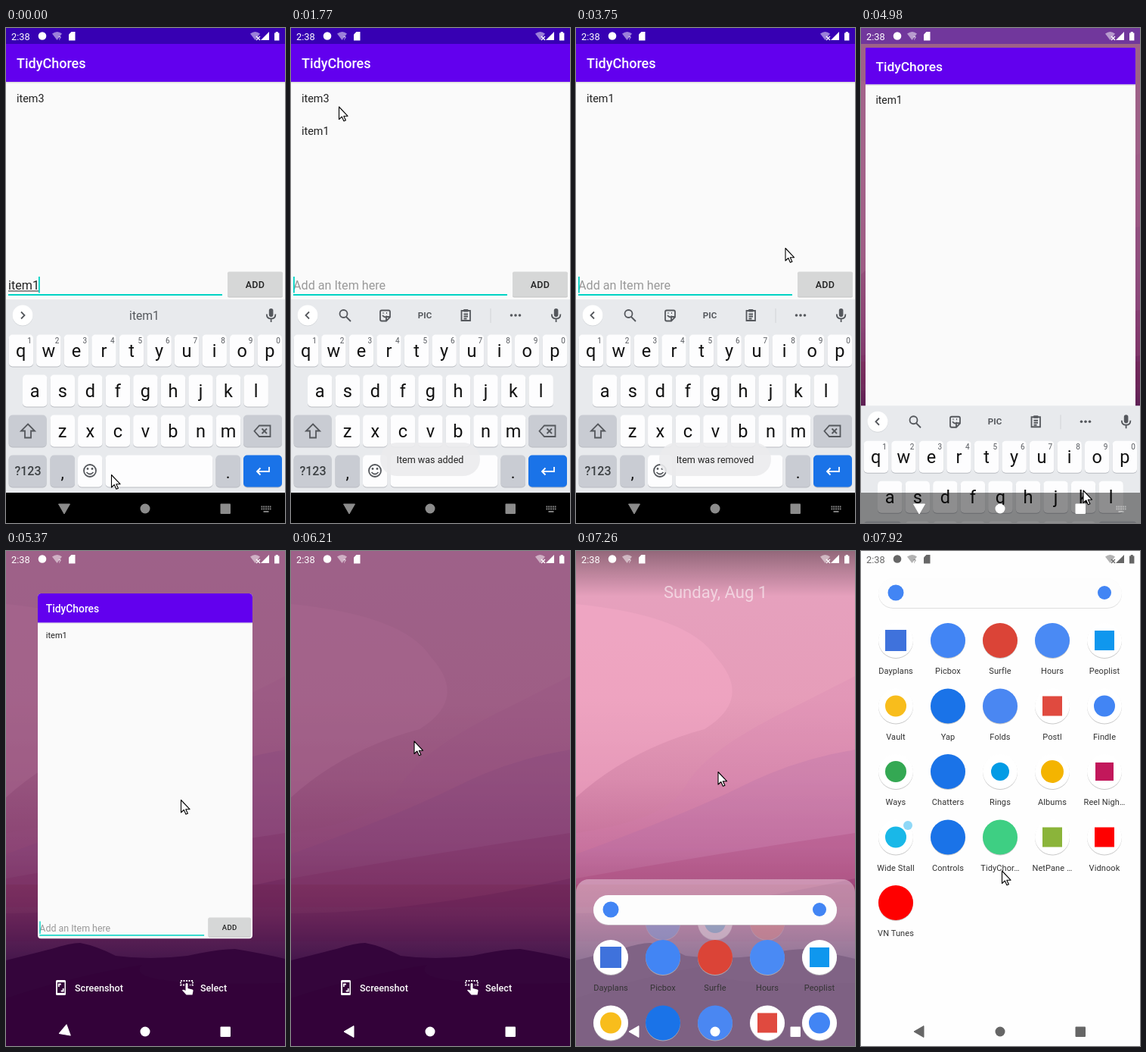
Write an HTML page that moves like this. It is 369 by 653 pixels and loops after 8000 ms.

```html
<!DOCTYPE html>
<html lang="en">
<head>
<meta charset="utf-8">
<title>Todo list demo</title>
<style>
html, body { margin: 0; width: 100%; height: 100%; overflow: hidden; background: #000; }
svg { display: block; width: 369px; height: 653px; font-family: Roboto, "Noto Sans", sans-serif; }
.line { fill: none; stroke: #55585d; stroke-width: 1.8; }
</style>
</head>
<body>
<svg id="stage" viewBox="0 0 369 653"></svg>
<script>
const W = 369, H = 653, LOOP = 8000;

// ---- drawing helpers
const rect = (x, y, w, h, fill, r = 0, more = '') =>
  `<rect x="${x}" y="${y}" width="${w}" height="${h}" rx="${r}" fill="${fill}" ${more}/>`;
const disc = (x, y, r, fill, more = '') => `<circle cx="${x}" cy="${y}" r="${r}" fill="${fill}" ${more}/>`;
const path = (d, fill, more = '') => `<path d="${d}" fill="${fill}" ${more}/>`;
const line = (d, more = '') => `<path class="line" d="${d}" ${more}/>`;
const text = (x, y, size, s, fill, more = '') =>
  `<text x="${x}" y="${y}" font-size="${size}" fill="${fill}" ${more}>${s}</text>`;
const group = (id, ...parts) => `<g id="${id}">${parts.join('')}</g>`;
const MID = 'text-anchor="middle"', MEDIUM = 'font-weight="500"';

// ---- wallpaper
const sky = [[0, '#e6a2bf'], [.3, '#e69db9'], [.46, '#d98bad'], [.6, '#c5709a'], [.66, '#b35a80'],
  [.735, '#964674'], [.79, '#6a3264'], [.83, '#502458']];
const wallpaper = () => group('wall',
  rect(0, 0, W, H, 'url(#sky)'),
  path('M0 70Q150 85 185 140Q235 195 170 235Q70 262 0 325z', '#f6acc8', 'opacity=".45"'),
  path('M0 372Q120 355 145 310T270 215T369 165V440H0z', '#cf7fae', 'opacity=".2"'),
  path('M0 400Q150 345 220 310T369 262V440H0z', '#a566a4', 'opacity=".2"'),
  path('M0 432Q180 400 369 372V470H0z', '#a03468', 'opacity=".22"'),
  path('M0 478Q160 478 369 432V515H0z', '#6b1c58', 'opacity=".22"'),
  path('M0 540Q40 530 60 525Q85 517 98 517Q120 521 145 534Q190 540 240 534Q280 525 303 525Q340 531 369 538V653H0z', '#35083d'),
  path('M0 590Q90 560 180 546Q150 575 369 570V653H0z', '#32033a', 'opacity=".7"'));

// ---- app window
const appWindow = () => group('app',
  `<g clip-path="url(#window)">`,
  rect(0, 21, W, 592, '#fafafa'),
  rect(0, 71, W, 1.5, '#dcdcdc'),
  rect(0, 21, W, 50, '#6200ee'),
  text(14, 53, 18, 'TidyChores', '#fff', MEDIUM),
  group('old', text(14, 98, 14.36, 'item3', '#212121')),
  group('fresh', text(14, 141, 14.36, 'item1', '#212121')),
  group('entry',
    rect(3, 351, 283, 2, '#00d3c4'),
    group('typed', text(3, 345, 16.15, 'item1', '#222'), rect(3, 346.5, 40, 1, '#222')),
    group('hint', text(3, 345, 16.15, 'Add an Item here', '#999')),
    group('caret', rect(0, 328, 1.8, 21.5, '#00d3c4')),
    rect(293, 322.5, 73, 33, '#c4c4c4', 2),
    group('button', rect(293, 321.5, 73, 33, '#d6d7d7', 2)),
    text(329.5, 342.5, 12.5, 'ADD', '#222', MID + MEDIUM.padStart(18) + ' letter-spacing=".3"')),
  `</g>`);

// ---- keyboard
const key = (x, y, w, fill = '#fdfdfe') => rect(x, y + 1, w, 42, '#b9bcc2', 5) + rect(x, y, w, 42, fill, 5);
const letters = (s, x0, y, digits) => [...s].map((c, i) => {
  const x = x0 + i * 36.55;
  return key(x, y, 32.5) + text(x + 16.2, y + 29, 23.5, c, '#111', MID) +
    (digits ? text(x + 27.5, y + 11, 10, (i + 1) % 10, '#55585d', MID) : '');
}).join('');
const GREY = '#c9ccd3';
const keyboard = () => group('keys',
  rect(0, 358, W, 256, '#e8eaed'),
  disc(22, 379.7, 13.5, '#cdd0d4'), disc(22, 379, 13.5, '#fff'),
  group('suggest', line('M20 374.5l4.5 4.5-4.5 4.5'),
    text(183, 385, 15.7, 'item1', '#55585d', MID)),
  group('tools', line('M24 374.5l-4.5 4.5 4.5 4.5'),
    `<circle class="line" cx="69.5" cy="377" r="5"/>`, line('M73 381l6 6'),
    line('M120 372.5h9q2 0 2 2v7l-5 5h-6q-2 0-2-2v-10q0-2 2-2zM131 381h-5v5M121 379q3 4 6 1M121.500 376h1M126 376h1'),
    text(177, 383, 11.5, 'PIC', '#55585d', MID + ' font-weight="700"'),
    line('M225.500 373h11.500v13h-11.500zM228.500 377.500h5.500M228.500 380.500h5.500M228.500 383.500h4'),
    rect(228, 371, 6.5, 3.5, '#55585d', 1),
    rect(263.5, 370, 1, 19, '#d2d4d8'),
    ...[291.5, 297, 302.5].map(x => disc(x, 379, 1.8, '#55585d'))),
  rect(347.8, 370, 5.6, 11, '#55585d', 2.8),
  line('M344.800 377.500q0 6 5.800 6t5.800-6M350.600 383.500v4.500', 'stroke-width="1.5"'),
  letters('qwertyuiop', 3.6, 404.5, true),
  letters('asdfghjkl', 22, 457.5),
  letters('zxcvbnm', 58.5, 510.5),
  key(3.6, 510.5, 50, GREY), key(314, 510.5, 51, GREY),
  line('M29 522.500l9 9h-5v9h-8v-9h-5z'),
  line('M335 524.500h14.500v14.500h-14.500l-6.500-7.250zM338.500 528.500l6.500 6.500M345 528.500l-6.500 6.500'),
  key(3.6, 563.5, 50, GREY), key(58.5, 563.5, 32.5, GREY), key(95, 563.5, 32.5),
  key(131.5, 563.5, 142), key(277.5, 563.5, 32.5, GREY), key(314, 563.5, 51, '#1a73e8'),
  text(29, 590, 16, '?123', '#3c4043', MID + ' ' + MEDIUM),
  text(74.7, 594, 22, ',', '#111', MID), text(293.7, 594, 22, '.', '#111', MID),
  `<circle class="line" cx="111" cy="584" r="8"/>`, line('M106.500 586q4.500 5 9 0'),
  disc(108, 581.5, 1.4, '#55585d'), disc(114, 581.5, 1.4, '#55585d'),
  line('M348 579v6h-16M336.500 580.500l-4.500 4.500 4.500 4.500', 'style="stroke:#fff"'));

const toast = (id, x, w, s) => group(id,
  rect(x, 547, w, 44, '#ececee', 22, 'opacity=".9"'),
  text(184, 574, 12.56, s, '#222', MID));

// ---- launcher
const WHITE = '#fff';
// label, disc colour, then for white discs the inner shape: colour, half size, square or not
const apps = [
  ['Dayplans', WHITE, '#3f72dc', 14, 1], ['Picbox', '#4285f4'], ['Surfle', '#db4437'], ['Hours', '#4a8af4'],
  ['Peoplist', WHITE, '#0f97ee', 13, 1], ['Vault', WHITE, '#f8bd1c', 14], ['Yap', '#1a73e8'],
  ['Folds', '#4a87f2'], ['Postl', WHITE, '#e04a3f', 13, 1], ['Findle', WHITE, '#4285f4', 14],
  ['Ways', WHITE, '#34a853', 14], ['Chatters', '#1a73e8'], ['Rings', WHITE, '#039be5', 12],
  ['Albums', WHITE, '#f4b400', 15], ['Reel Nigh…', WHITE, '#c2185b', 12, 1],
  ['Wide Stall', WHITE, '#19b8e8', 14], ['Controls', '#1a73e8'], ['TidyChor…', '#3ecf83'],
  ['NetPane …', WHITE, '#8bb43a', 13, 1], ['Vidnook', WHITE, '#f00', 13, 1], ['VN Tunes', '#f00']];
const badge = (x, y, [, base, mark, r, square]) =>
  disc(x, y + 1, 23, '#bbb', 'opacity=".8"') + disc(x, y, 23, base) +
  (!mark ? '' : square ? rect(x - r, y - r, 2 * r, 2 * r, mark) : disc(x, y, r, mark));
const colX = i => 46 + 69 * (i % 5);
const rowY = i => 118 + 86.5 * Math.floor(i / 5);
const drawer = () => group('drawer',
  group('grid', ...apps.map((a, i) => badge(colX(i), rowY(i), a) +
    text(colX(i), rowY(i) + 44, 11, a[0], '#333', MID + ' letter-spacing=".1"')),
    disc(62, 362, 6, '#8fd8f7')),
  rect(23, 37, 322, 39, '#ccc', 19.5, 'opacity=".6"'),
  rect(23, 36, 322, 39, '#fdfdfd', 19.5),
  disc(46, 55, 10.5, '#4285f4'), disc(322, 55, 9, '#4285f4'));
const home = () => group('home',
  rect(0, 0, W, 60, 'url(#shade)'),
  group('date', text(184.5, 62, 22, 'Sunday, Aug 1', '#fff', MID)),
  group('dock', ...[11, 15, 2].map((n, i) => badge(115 + 69 * i, 0, apps[n]))));

const actions = () => group('actions',
  path('M67.500 566h10q1.500 0 1.500 1.500v17q0 1.500-1.500 1.500h-10q-1.500 0-1.500-1.500v-17q0-1.500 1.500-1.500zM68 569v14h9.500v-14z', '#fff', 'fill-rule="evenodd"'),
  line('M69.800 575v-3.500h3M75.700 577v3.500h-3', 'style="stroke:#fff"'),
  text(91, 580.5, 12.6, 'Screenshot', '#fff', MEDIUM),
  line('M236 572.500h-5v-5.500h16v5.500h-4', 'style="stroke:#fff" stroke-dasharray="2 1.500"'),
  path('M237.500 571q1.500-2 3 0v6l6 1.500q1.500.5 1 2l-1 5h-8l-5.500-6q1-1.500 4.500.5z', '#fff'),
  text(257, 580.5, 12.6, 'Select', '#fff', MEDIUM));

// ---- system bars and mouse arrow
const statusBar = () => group('status',
  text(7, 15.5, 12.8, '2:38', 'currentColor'),
  disc(48, 10.5, 5.3, 'currentColor'),
  path('M61 7.500q7-5 13 0l-6.500 8.500z', 'currentColor', 'opacity=".5"'),
  text(69, 16, 8, '?', 'currentColor'),
  path('M83 8.500l3.500-3.500h5v11.500h-8.500z', 'currentColor'),
  path('M323 7.500q6.500-5 13 0l-6.500 8.500z', 'currentColor', 'opacity=".5"'),
  path('M331 11l5 5m0-5l-5 5', 'none', 'stroke="currentColor" stroke-width="1.3"'),
  path('M337 16h11v-11z', 'currentColor'),
  path('M355 6.500h1.700v-1.500h3v1.500h1.700v10h-6.400z', 'currentColor'));
const navBar = () => group('nav',
  group('back', path('M-7 0L6-7.500V7.500z', 'currentColor', 'stroke="currentColor" stroke-linejoin="round"')),
  disc(184, 634, 6.5, 'currentColor'),
  rect(283.5, 627.5, 13.5, 13.5, 'currentColor', 1),
  group('switcher', line('M337.500 631.500h13M337.500 634.500h13', 'style="stroke:currentColor" stroke-dasharray="1.800 1"'),
    line('M340.500 638h7', 'style="stroke:currentColor"')));
const arrow = () => group('arrow',
  path('M0 0V16.500L3.800 13l2.600 5.800 2.500-1.100-2.600-5.500h5.200z', '#fff', 'stroke="#000" stroke-width="1.100" stroke-linejoin="round"'));

document.getElementById('stage').innerHTML =
  `<defs><linearGradient id="sky" x2="0" y2="1">${sky.map(([o, c]) => `<stop offset="${o}" stop-color="${c}"/>`).join('')}</linearGradient>
  <linearGradient id="shade" x2="0" y2="1"><stop stop-opacity=".36"/><stop offset="1" stop-opacity="0"/></linearGradient>
  <clipPath id="window"><rect id="frame" x="0" y="21" width="369" height="592"/></clipPath></defs>` +
  wallpaper() + group('scrim', rect(0, 0, W, H, '#320038')) + home() +
  group('panel', rect(0, 0, W, H + 40, '#fefefe', 17)) + drawer() + actions() + appWindow() + keyboard() +
  group('bars', rect(0, 0, W, 21, '#3700b3'), rect(0, 613, W, 40, '#000')) +
  toast('added', 118, 132, 'Item was added') + toast('removed', 110, 148, 'Item was removed') +
  statusBar() + navBar() + arrow();

// ---- timeline
const $ = {};
document.querySelectorAll('[id]').forEach(e => $[e.id] = e);
const fade = (id, o) => {
  $[id].setAttribute('opacity', o);
  $[id].style.display = o > 0 ? '' : 'none';
};
const move = (id, x, y, more = '') => $[id].setAttribute('transform', `translate(${x} ${y}) ${more}`);
const clamp = v => Math.max(0, Math.min(1, v));

// rows of [time, value, ...], linear in between
function track(rows, t, col = 1) {
  const i = rows.findIndex(r => r[0] > t);
  if (i < 0) return rows[rows.length - 1][col];
  if (i === 0) return rows[0][col];
  const a = rows[i - 1], b = rows[i];
  return a[col] + (b[col] - a[col]) * (t - a[0]) / (b[0] - a[0]);
}

// the screen refreshes only at these times
const ticks = [0, 120, 270, 390, 540, 660, 810, 930, 1080, 1230, 1350, 1500, 1620, 1770, 1890, 2040, 2190, 2310, 2430,
  2730, 2850, 3000, 3120, 3240, 3390, 3510, 3630, 3750, 3900, 4020, 4170, 4290, 4440, 4560, 4710, 4830,
  4980, 5100, 5220, 5370, 5490, 5640, 5790, 5940, 6060, 6210, 6330, 6450, 6600, 6720, 6840, 6960,
  7110, 7260, 7380, 7510, 7650, 7780, 7920];

const mouse = [[0, 139.5, 589.5], [120, 150, 575], [270, 212, 490], [390, 290, 385], [540, 324, 340], [810, 324, 338],
  [930, 290, 300], [1080, 215, 212], [1230, 165, 172], [1500, 92, 122], [1770, 63.5, 104], [2190, 51.5, 97.5],
  [2730, 51.5, 97.5], [3000, 90, 130], [3390, 210, 240], [3750, 277, 290.5], [3900, 281, 330], [4290, 300, 540],
  [4560, 300, 628], [4830, 297, 632], [4980, 294, 610], [5220, 250, 390], [5370, 231.5, 328.5],
  [5640, 190, 390], [5790, 175, 400], [5940, 170, 340], [6060, 166, 280], [6210, 163, 251],
  [6450, 170, 340], [6720, 186, 540], [6960, 190, 620], [7110, 190, 500], [7260, 188, 291.5],
  [7380, 188, 190], [7510, 188, 165], [7650, 188, 250], [7780, 187, 370], [7920, 186.5, 422]];
const shrink = [[4830, 0], [4980, .14], [5100, .55], [5220, .88], [5370, 1]];
const hideKeys = [[4830, 0], [4980, .55], [5100, 1]];
const lift = [[5790, 0], [5940, -60], [6060, -300], [6210, -620]];
const goHome = [[6210, 0], [6330, .5], [6450, 1]];
const sheet = [[6960, 535], [7110, 520], [7260, 418], [7380, 130], [7510, 0]];
const turn = [[4980, -90], [5370, -20], [5490, 0]];

function draw(t) {
  const done = t >= 810, p = track(shrink, t), k = track(hideKeys, t), h = track(goHome, t);
  const inApp = 1 - clamp(p * 4), off = track(sheet, t), open = 1 - off / 535;

  // window and its list
  const s = 1 - .2304 * p;
  move('app', 42 * p, 39.8 * p + track(lift, t), `scale(${s})`);
  $.frame.setAttribute('rx', 6 * p);
  fade('app', t < 6210 ? 1 : 0);
  fade('old', track([[2430, 1], [2730, .4], [2850, 0]], t));
  fade('fresh', track([[660, 0], [810, .6], [930, 1]], t));
  move('fresh', 0, track([[2850, 0], [3120, -43]], t));
  move('entry', 0, k > .5 ? 255 : 0);
  fade('typed', done ? 0 : 1);
  fade('hint', done ? 1 : 0);
  const lit = !done || t >= 4980 || Math.floor((t - 750) / 500) % 2 === 0;
  move('caret', done ? 3 : 43, 0);
  fade('caret', lit ? 1 : 0);
  fade('button', t >= 660 && t < 930 ? .75 : 1);

  // keyboard and toasts
  move('keys', 0, 255 * k);
  fade('keys', k < 1 ? 1 : 0);
  fade('suggest', done ? 0 : 1);
  fade('tools', done ? 1 : 0);
  fade('added', track([[930, 0], [1080, .6], [1230, 1], [2730, 1], [2850, 0]], t));
  fade('removed', track([[2850, 0], [3000, .6], [3120, 1], [4830, 1], [4980, 0]], t));

  // launcher
  fade('scrim', .4 * (1 - h));
  fade('actions', clamp(p * 2 - 1) * (1 - clamp(h * 2)));
  fade('home', h);
  fade('date', clamp(track([[7110, 1], [7260, .55], [7380, 0]], t)));
  move('dock', 0, 490 + (off - 418) * .34);
  fade('dock', track([[7110, 1], [7260, .35], [7380, 0]], t));
  move('drawer', 0, off);
  fade('drawer', h);
  fade('grid', clamp((535 - off) / 100));
  move('panel', 0, off * 433 / 418 - (off ? 0 : 20));
  fade('panel', h * track([[0, 0], [.22, .37], [.75, .92], [1, 1]], open));

  // bars
  fade('bars', inApp);
  $.status.style.color = open > .7 ? '#666' : '#fff';
  $.nav.style.color = inApp > .5 ? '#8c8c8c' : open > .7 ? '#666' : '#fff';
  fade('switcher', inApp);
  move('back', 77, 634, `rotate(${track(turn, t)})`);
  move('arrow', track(mouse, t), track(mouse, t, 2));
}

function tick() {
  const t = performance.now() % LOOP;
  draw(ticks.filter(v => v <= t).pop());
  requestAnimationFrame(tick);
}
tick();
</script>
</body>
</html>
```
